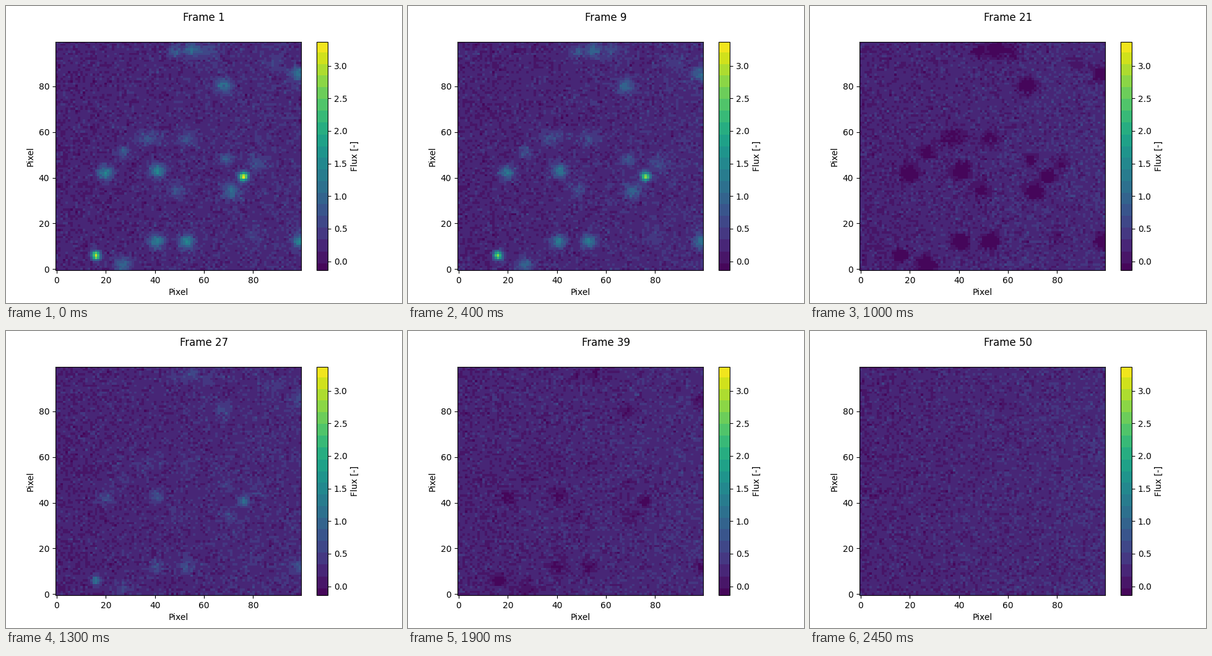
These frames come from a looping animation (640x480 px, 2.5 s). A matplotlib script:

```python
import numpy as np
import matplotlib.pyplot as plt
from matplotlib.animation import FuncAnimation
from matplotlib.colors import ListedColormap

SIZE = 100
FRAMES = 50
INTERVAL = 50
VMIN, VMAX = -0.138, 3.37
NOISE = 0.1

# Star groups: peak flux, width, positions
GROUPS = [
    (2.85, 1.35, [(16, 6), (76, 40.5)]),
    (1.15, 2.1, [(20, 42), (41, 43), (40.5, 12), (53, 12), (99, 12)]),
    (0.8, 2.3, [(27, 2), (71, 34), (68, 80), (98.5, 85), (55, 96)]),
    (0.6, 1.8, [(69, 48), (27, 51), (48, 95)]),
    (0.4, 2.4, [(49, 34.5), (36, 57), (53, 57), (81, 46), (62, 95)]),
    (0.22, 2.4, [(41, 58), (80, 14), (88, 90)]),
]


def banded_viridis(low=0.0325, high=0.954, inner=18):
    """Viridis in flat steps, with narrower bands at both ends."""
    edges = np.concatenate([[0], np.linspace(low, high, inner + 1), [1]])
    centers = (edges[:-1] + edges[1:]) / 2
    steps = (np.arange(256) + 0.5) / 256
    band = np.searchsorted(edges, steps, side="right") - 1
    return ListedColormap(plt.get_cmap("viridis")(centers[band]))


yy, xx = np.mgrid[0:SIZE, 0:SIZE]
background = 0.195 + 0.095 * xx / SIZE


def star(x, y, peak, width):
    return peak * np.exp(-((xx - x) ** 2 + (yy - y) ** 2) / (2 * width ** 2))


stars = sum(star(x, y, peak, width)
            for peak, width, spots in GROUPS for x, y in spots)


def pulse(i):
    """Full brightness at the start, then two sine cycles over the loop."""
    return np.sin(4 * np.pi * i / (FRAMES - 1)) if i else 1


def flux(i):
    noise = np.random.default_rng(100 + i).normal(0, NOISE, (SIZE, SIZE))
    return background + pulse(i) * stars + noise


fig, ax = plt.subplots(figsize=(6.4, 4.8), dpi=100)
image = ax.imshow(flux(0), origin="lower", aspect="auto",
                  interpolation="nearest", cmap=banded_viridis(),
                  vmin=VMIN, vmax=VMAX)
ax.set_xlabel("Pixel")
ax.set_ylabel("Pixel")
fig.colorbar(image, ax=ax, label="Flux [-]")
title = fig.suptitle("Frame 1")


def update(i):
    image.set_data(flux(i))
    title.set_text(f"Frame {i + 1}")
    return image, title


anim = FuncAnimation(fig, update, frames=FRAMES, interval=INTERVAL,
                     repeat=True, repeat_delay=0, blit=False)
plt.show()
```
